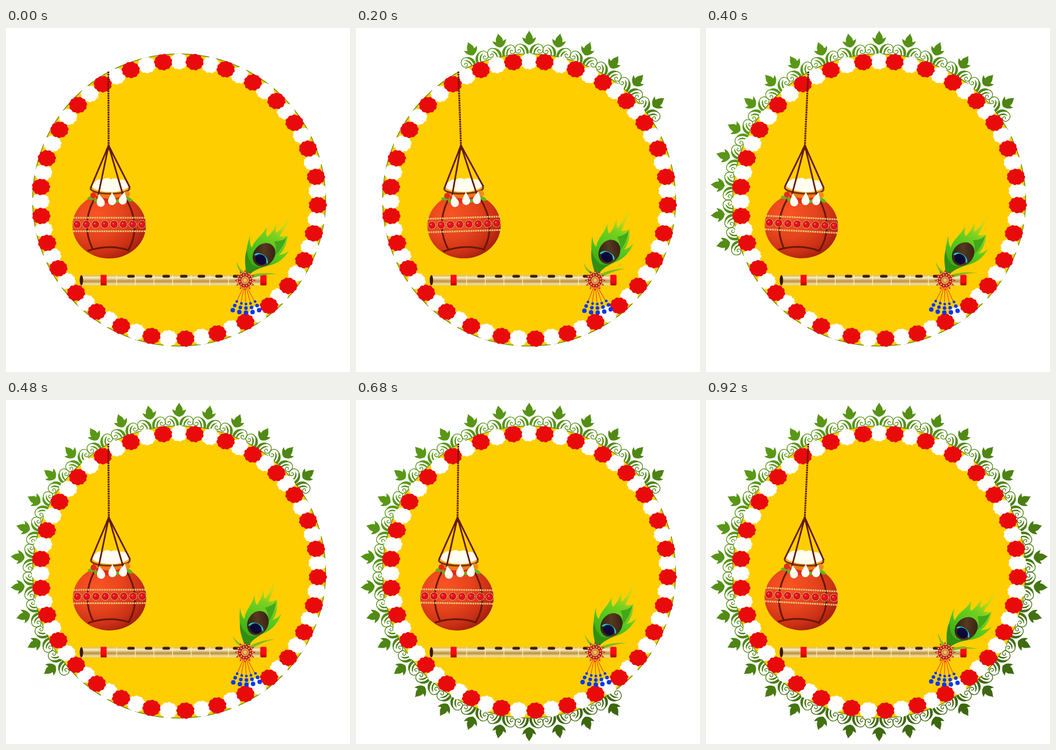
These frames come from a looping animation (600x600 px, 1000 ms). An HTML page:

```html
<!DOCTYPE html>
<html lang="en">
<head>
<meta charset="utf-8">
<title>Festive pot, flute and feather</title>
<style>
html, body { margin: 0; height: 100%; overflow: hidden; background: #fff; }
svg { display: block; width: 100vw; height: 100vh; }
</style>
</head>
<body>
<svg viewBox="0 0 600 600">
  <defs>
    <radialGradient id="clay" cx=".32" cy=".32" r=".8">
      <stop offset="0" stop-color="#fa5423"/><stop offset=".45" stop-color="#e6441d"/>
      <stop offset=".75" stop-color="#cb3115"/><stop offset="1" stop-color="#9a1a0c"/>
    </radialGradient>
    <linearGradient id="bamboo" x2="0" y2="1">
      <stop offset="0" stop-color="#d9b45c"/><stop offset=".25" stop-color="#f8edc0"/>
      <stop offset=".6" stop-color="#bd903c"/><stop offset=".85" stop-color="#efdc9c"/>
      <stop offset="1" stop-color="#e8cf80"/>
    </linearGradient>
    <linearGradient id="cuff" x2="0" y2="1">
      <stop offset=".6" stop-color="#fb0a14"/><stop offset="1" stop-color="#a8050a"/>
    </linearGradient>
    <linearGradient id="plume" gradientUnits="userSpaceOnUse" x1="422" y1="425" x2="495" y2="325">
      <stop offset="0" stop-color="#3a9c14"/><stop offset=".4" stop-color="#54c81e"/>
      <stop offset=".62" stop-color="#78d020"/><stop offset=".8" stop-color="#c4d81c"/>
      <stop offset="1" stop-color="#f4d20c"/>
    </linearGradient>
    <linearGradient id="eye" x2="1" y2="1">
      <stop offset="0" stop-color="#24150c"/><stop offset=".5" stop-color="#573a20"/>
      <stop offset="1" stop-color="#2a180c"/>
    </linearGradient>
    <g id="motif">
      <path d="M0 0C2 5 7 8 6 14C8 14 10 13 12 11.500C11 18 7 23 0 25C-7 23-11 18-12 11.500C-10 13-8 14-6 14C-7 8-2 5 0 0Z"/>
      <g id="curl">
        <path d="M.8 41C-1 31 6 23 16 23.500C9 26 5 32 4.500 41Z"/>
        <path d="M7.500 41C7 34 11 28 18 28C13 31 10 35 9.500 41Z"/>
        <path d="M13 24C21 22 25 28 24.500 34C24 40 15 41 15 35.500C15 32 20 32 19.500 35.500" fill="none" stroke="currentColor" stroke-width="1.3"/>
      </g>
      <use href="#curl" transform="scale(-1 1)"/>
    </g>
  </defs>

  <ellipse cx="302" cy="300" rx="255.5" ry="254.7" fill="#ffce00" stroke="#6d8f12" stroke-width="1.5"/>
  <g id="border"></g>
  <g id="garland"></g>

  <g id="pot">
    <path d="M178.5 76L179 205" stroke="#651800" stroke-width="3.2" stroke-dasharray="3 1.1"/>
    <ellipse cx="180" cy="345" rx="64" ry="57" fill="url(#clay)"/>
    <path d="M149 280L156 300Q182 310 208 300L215 280Z" fill="#f07818"/>
    <path d="M156 292Q182 304 210 290L206 302Q182 310 158 302Z" fill="#e02818"/>
    <path d="M153 300Q130 345 152 387M208 296Q238 345 213 388M142 389Q180 376 215 388" fill="none" stroke="#6a1800" stroke-width="3"/>
    <ellipse cx="181.500" cy="280" rx="34" ry="9" fill="#ffb028" stroke="#753409" stroke-width="3"/>
    <path d="M149 277Q147 270 156 268Q160 262 168 265Q175 259 183 264Q191 260 198 265Q207 263 210 269Q217 271 215 277Q200 287 182 286Q160 286 149 277Z" fill="#fffdf0"/>
    <g fill="#62b51c">
      <ellipse cx="148" cy="297" rx="6" ry="3"/><ellipse cx="158" cy="301" rx="5" ry="3"/>
      <ellipse cx="194" cy="302" rx="5" ry="3"/><ellipse cx="215" cy="299" rx="6" ry="3" transform="rotate(30 215 299)"/>
    </g>
    <circle cx="152" cy="292" r="5" fill="#e62a1c"/>
    <circle cx="211" cy="290" r="5.500" fill="#f58a1c"/>
    <path d="M148 278L179 205L216 278M179 205L161 291M179 205L204 291" fill="none" stroke="#651800" stroke-width="2.800"/>
    <path d="M179 202L174 213H184Z" fill="#651800"/>
    <g id="drops" fill="#fffdf2"></g>
    <path d="M117 331H244M117 354.500H244" stroke="#e9c078" stroke-width="3" stroke-dasharray="3 1.100"/>
    <g id="gems"></g>
  </g>

  <g id="flute">
    <rect x="131" y="431" width="320" height="18" fill="url(#bamboo)"/>
    <ellipse cx="131.500" cy="440" rx="3" ry="9" fill="#3b1702"/>
    <rect x="165" y="430.500" width="10.500" height="18.500" fill="url(#cuff)"/>
    <rect x="443.500" y="430.500" width="11" height="18.500" rx="2" fill="url(#cuff)"/>
  </g>

  <g id="feather">
    <path d="M418 432Q404 426 402 407Q407 423 420 428M424 432Q445 425 473 429Q450 429 430 436" fill="#7fba20"/>
    <path d="M419 430C417 412 417 385 426 362C424 374 427 381 429 383C434 368 446 364 455 347C453 359 454 363 456 364C463 358 469 350 473 338C470 352 471 356 472 357C482 349 490 338 497 323C493 342 484 352 477 363C483 364 488 364 492 362C489 380 484 389 476 396C483 395 489 393 494 388C484 404 472 411 460 414C446 418 434 419 424 431Z" fill="url(#plume)"/>
    <path d="M420 430C416 412 416 398 420 387C421 400 424 405 426 407C430 418 445 420 464 410C450 418 435 419 424 431Z" fill="#2f8f12"/>
    <path d="M468 372Q484 372 490 364Q484 384 466 400Q474 386 468 372Z" fill="#43a81a"/>
    <g transform="translate(450 395.500) rotate(-50)">
      <ellipse rx="22" ry="18" fill="url(#eye)"/>
      <path d="M-12-13C1-15 4 13-9 15C-5 8-5-6-12-13Z" fill="#28c4c4"/>
      <ellipse cx="-10" cy="1" rx="8.500" ry="10.500" fill="#0b0838"/>
    </g>
  </g>

  <g id="tassel"></g>
  <g id="medal" transform="translate(417 440)"></g>
</svg>
<script>
const el = id => document.getElementById(id);
const list = (n, make) => Array.from({length: n}, (_, i) => make(i)).join('');
const circle = (x, y, r, fill, more = '') => `<circle cx="${x}" cy="${y}" r="${r}" fill="${fill}" ${more}/>`;
const COUNT = 34;

// Border ornaments, laid out anticlockwise from the upper right
el('border').innerHTML = list(COUNT, i => {
  const deg = (5 - i) * 360 / COUNT, a = deg * Math.PI / 180;
  const light = 30 + 3 * Math.cos(a) - 3 * Math.sin(a) + (Math.cos(a) < 0 ? 3 * Math.cos(a) : 0);
  const color = `hsl(89 74% ${light}%)`;
  return `<use href="#motif" transform="translate(302 300) rotate(${deg}) translate(0 -295.500)" fill="${color}" color="${color}"/>`;
});

// Garland: red blossoms at these bearings, white ones halfway between
const bearings = [6.4, 19.6, 32.1, 44.5, 56.2, 68.3, 80.4, 92.1, 103.9, 115.7, 128.2, 139.6, 151.5, 164, 177.4,
  191.5, 204.7, 216.4, 228, 240.5, 252, 263.4, 275.4, 287.5, 300.4, 313.2, 326.6, 339.6, 353.4];
function blossom(deg, fill) {
  const a = deg * Math.PI / 180;
  const x = 302 + 242 * Math.sin(a), y = 300 - 242 * Math.cos(a);
  const points = list(60, i => {
    const t = i * Math.PI / 30, r = 14 + Math.abs(Math.sin(5.5 * t + a)) * 1.6;
    return `${(x + 1.03 * r * Math.cos(t)).toFixed(1)},${(y + .93 * r * Math.sin(t)).toFixed(1)} `;
  });
  return `<polygon points="${points}" fill="${fill}"/>`;
}
el('garland').innerHTML =
  bearings.map((b, i) => blossom((b + (bearings[i + 1] || 366.4)) / 2, '#fff')).join('') +
  bearings.map(b => blossom(b, '#e90a0b')).join('');

el('gems').innerHTML = list(8, i => {
  const x = 124 + i * 16.15;
  return circle(x, 342.5, 6.6, '#a5121a', 'stroke="#e9b96c" stroke-width="1.3" stroke-dasharray="2 1"') +
    circle(x, 342.5, 5, '#ee0d1e') + circle(x - 1.5, 341, 1.5, '#ff6a6a');
});
el('drops').innerHTML = [[165, 303], [185, 300], [204, 299]].map(([x, y], i) =>
  `<path d="M0-14C3-7 7-3 7 2A7 7 0 0 1-7 2C-7-3-3-7 0-14Z" transform="translate(${x} ${y}) rotate(${i * 12 - 12})"/>`).join('');

el('flute').innerHTML +=
  list(7, i => `<path d="M${193 + i * 32.5} 431V449" stroke="#fff3b8" stroke-width="1.2"/>`) +
  list(7, i => `<rect x="${211.5 + i * 30.7}" y="430.500" width="13" height="5" rx="2.500" fill="#421d04"/>`);

el('tassel').innerHTML =
  list(5, i => `<path d="M417 445L${418 + (i - 2) * 8} 478" stroke="#f03a10"/>`) +
  list(15, n => {
    const i = n % 5 - 2, row = Math.floor(n / 5);
    return circle(418.5 + i * (8 + 1.75 * row), [481.5, 488.5, 496.5][row] - i * i * 1.1, 2.4 + .75 * row, '#0a36f5');
  });

el('medal').innerHTML =
  list(12, i => `<g transform="rotate(${i * 30})"><path d="M-4-8L0-18.500L4-8Z" fill="#c4151a"/>${circle(0, -13.5, 1.2, '#f6cf8c')}</g>`) +
  circle(0, 0, 10.5, '#b81c16') +
  list(12, i => `<g transform="rotate(${i * 30 + 15})">${circle(0, -9.5, 1.3, '#f0b868')}</g>`) +
  circle(0, 0, 7.5, '#e39a4c', 'stroke="#8e1a10"') + circle(0, 0, 4, '#f3b870', 'stroke="#c46a24"');

// Keys are [step, value]; a smooth curve runs through them
const sway = [[0, 0], [4, 11.5], [5, 8.5], [8, -12], [9.2, -15], [10, -13.7], [14, 11], [17, -4], [21, -15.5], [23, -14]];
const tilt = [[0, 0], [4, -11], [5, -10], [8, -.3], [10, -2], [14, -21], [17, -5.5], [21, 5], [23, 5.2]];
const grown = [[0, 0], [5, 8], [8, 13], [10, 16], [14, 21], [17, 26], [23, 34]];

function at(keys, s) {
  const last = keys.length - 1;
  const i = Math.min(last - 1, keys.findLastIndex(k => k[0] <= s));
  const slope = n => {
    const a = keys[Math.max(0, n - 1)], b = keys[Math.min(last, n + 1)];
    return (b[1] - a[1]) / (b[0] - a[0]);
  };
  const [t0, v0] = keys[i], [t1, v1] = keys[i + 1];
  const h = t1 - t0, u = (s - t0) / h, w = 1 - u;
  return v0 * w * w * (1 + 2 * u) + v1 * u * u * (3 - 2 * u) + h * u * w * (slope(i) * w - slope(i + 1) * u);
}

const turn = (id, deg, x, y) => el(id).setAttribute('transform', `rotate(${deg} ${x} ${y})`);
const ornaments = [...el('border').children];
const start = performance.now();

function draw(now) {
  const step = Math.min(23, Math.floor(Math.max(0, now - start) % 1000 / 40));
  const dx = at(sway, step), shown = Math.round(at(grown, step));
  ornaments.forEach((o, i) => o.style.display = i < shown ? '' : 'none');
  turn('pot', -dx * .212, 178.5, 76);
  turn('tassel', step ? -dx * .27 - .8 : 0, 417, 440);
  turn('feather', at(tilt, step), 417, 439);
  requestAnimationFrame(draw);
}
draw(start);
</script>
</body>
</html>
```
